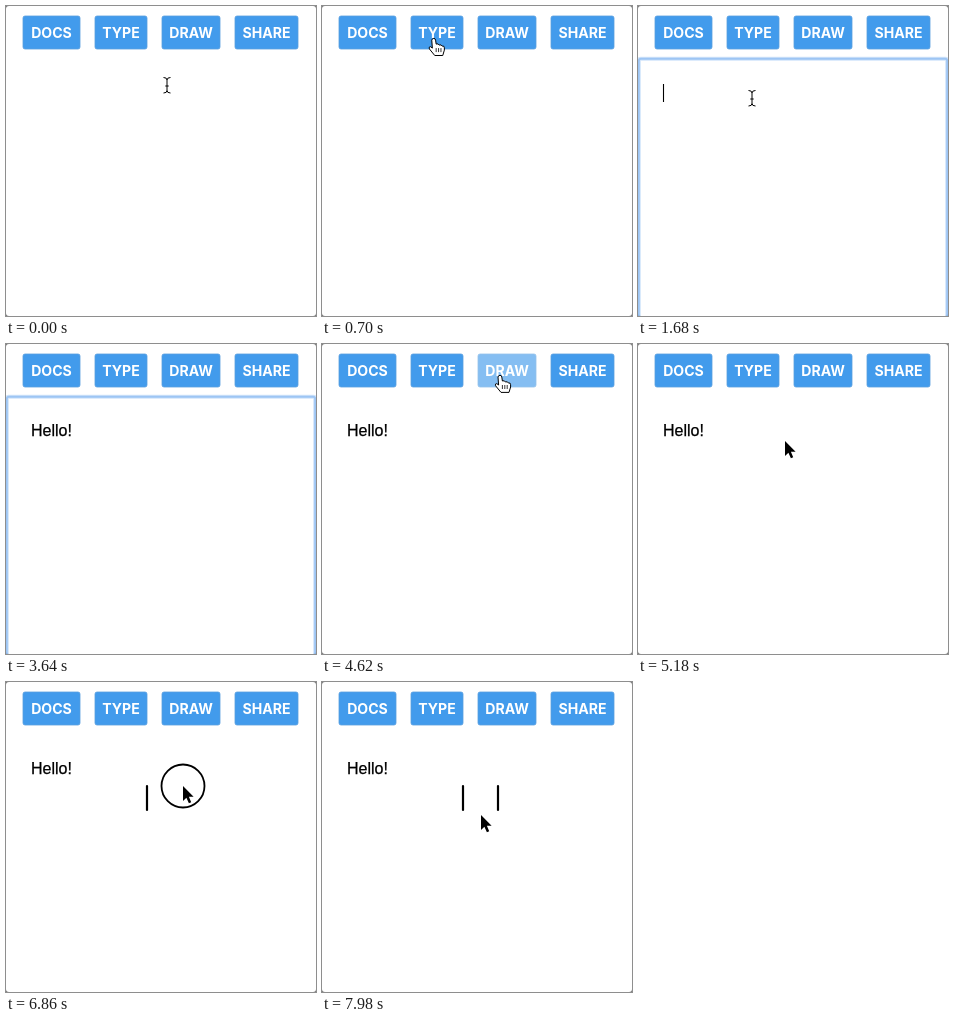
An HTML page for the animation above (8000 ms loop, 310x310 px).

```html
<!DOCTYPE html>
<html lang="en">
<head>
<meta charset="utf-8">
<title>Type and draw</title>
<style>
  html, body { margin: 0; width: 100%; height: 100%; overflow: hidden; background: #777; }
  svg { display: block; width: 310px; height: 310px; }
  .button rect { fill: #429bec; stroke: #5a9fdf; stroke-width: .8; }
  .button text { font: 700 14.1px Inter, sans-serif; fill: #fff; text-anchor: middle; }
  #hello { font: 16px "Liberation Sans", Arial, sans-serif; stroke: #000; stroke-width: .25; }
  .ink { stroke: #000; stroke-width: 2.2; stroke-linecap: round; }
</style>
</head>
<body>
<svg viewBox="0 0 310 310">
  <rect width="310" height="310" rx="3" fill="#fff"/>
  <g id="buttons"></g>
  <g id="ring" fill="none" stroke="#8dbbf2">
    <rect x=".8" y="52.8" width="308.4" height="262" rx="2" stroke-width="4" opacity=".4"/>
    <rect x=".8" y="52.8" width="308.4" height="262" rx="2" stroke-width="2" opacity=".75"/>
  </g>
  <text id="hello" x="25" y="92"></text>
  <path id="caret" d="M.5 78V96" stroke="#000" stroke-width="1.1"/>
  <g id="lines"></g>
  <g id="pointer">
    <circle id="press" r="21.5" fill="none" stroke="#000" stroke-width="1.8"/>
    <path id="arrow" d="M0 0V15L3.4 11.8L5.9 17.2L8.2 16.2L5.9 10.8H10.6Z" stroke="#fff" stroke-width="1.4" paint-order="stroke"/>
    <path id="beam" d="M-3.5-7.5Q0-7.5 0-5V5.5Q0 8 3.5 8M3.5-7.5Q0-7.5 0-5M0 5.5Q0 8-3.5 8M-1.7 1H1.7" fill="none" stroke="#000"/>
    <g id="hand" stroke="#000" stroke-linejoin="round">
      <path d="M-1.4 9L-2 1Q-1.6-.7 0-.7T1.8 1L2.4 5Q4.6 4 5.4 6Q7.6 5 8.4 7Q10.6 6.4 10.6 8.7V11L9 16.4H1L-4.4 9.8Q-5.2 7.4-3.2 7.6Z" fill="#fff"/>
      <path d="M2.4 9V13M4.8 9V13M7.2 9V13" stroke-width=".8"/>
    </g>
  </g>
</svg>
<script>
const $ = id => document.getElementById(id);
const LOOP = 8000, STEP = 70, GAP = 15;
const FOCUS = 1610, DRAW = 4480;

const widths = { DOCS: 57, TYPE: 52, DRAW: 58, SHARE: 63 };
let right = 2;
const buttons = Object.entries(widths).map(([label, width]) => {
  const left = right + GAP;
  right = left + width;
  $("buttons").innerHTML += `<g class="button" id="${label}">
    <rect x="${left}" y="10" width="${width}" height="33" rx="2"/>
    <text x="${left + width / 2}" y="32">${label}</text></g>`;
  return { left, right };
});

// Pointer moves: start, end, x, y
const moves = [
  [0, 280, 193, 52], [280, 770, 107, 32], [1260, FOCUS, 114, 92],
  [3710, 4410, 178, 32], [4760, 5180, 147, 97], [5180, 5530, 141, 104],
  [5740, 6090, 141, 129], [6230, 6580, 177, 104], [6860, 7210, 176, 129],
  [7420, 7700, 164, 144], [7700, 7980, 159, 133]
];
const strokes = [
  { down: 5600, up: 6160, x: 141 },
  { down: 6860, up: 7280, x: 176 }
];
const keyTimes = [2240, 2450, 2590, 2660, 2800, 3080];

$("lines").innerHTML = strokes.map(() => `<path class="ink"/>`).join("");

const within = (t, a, b) => t >= a && t < b;
const clamp = v => Math.max(0, Math.min(1, v));
const smooth = u => u * u * (3 - 2 * u);
const show = (el, on) => el.style.display = on ? "" : "none";

function pointerAt(t) {
  let x = 161, y = 79;
  for (const [start, end, toX, toY] of moves) {
    const e = smooth(clamp((t - start) / (end - start)));
    x += (toX - x) * e;
    y += (toY - y) * e;
  }
  return [x, y];
}

function pressButton(id, t, start) {
  const dim = clamp((t - start + STEP) / 140) * clamp((start + 350 - t) / 140);
  $(id).style.opacity = 1 - 0.36 * dim;
}

function render(t) {
  const [x, y] = pointerAt(t);
  const overButton = y < 43 && buttons.some(b => within(x, b.left, b.right));
  const overText = y > 52 && t < DRAW;

  pressButton("TYPE", t, 1050);
  pressButton("DRAW", t, DRAW);
  show($("ring"), within(t, FOCUS, DRAW));

  const hello = $("hello");
  hello.textContent = "Hello!".slice(0, keyTimes.filter(k => k <= t).length);
  $("caret").setAttribute("transform", `translate(${25 + hello.getComputedTextLength()})`);
  show($("caret"), within(t, FOCUS, 2170) || within(t, keyTimes[0], 3640));

  strokes.forEach((s, i) => {
    const line = $("lines").children[i];
    const bottom = Math.min(128, pointerAt(Math.min(t, s.up))[1]);
    show(line, t > s.down && bottom > 105);
    line.setAttribute("d", `M${s.x} 104V${bottom}`);
  });

  $("pointer").setAttribute("transform", `translate(${x} ${y})`);
  show($("pointer"), !within(t, keyTimes[0], 3710));
  show($("press"), strokes.some(s => within(t, s.down, s.up)));
  show($("hand"), overButton);
  show($("beam"), overText && !overButton);
  show($("arrow"), !overButton && !overText);
}

function tick() {
  const t = performance.now() % LOOP;
  render(Math.floor(t / STEP) * STEP);
  requestAnimationFrame(tick);
}
tick();
</script>
</body>
</html>
```
